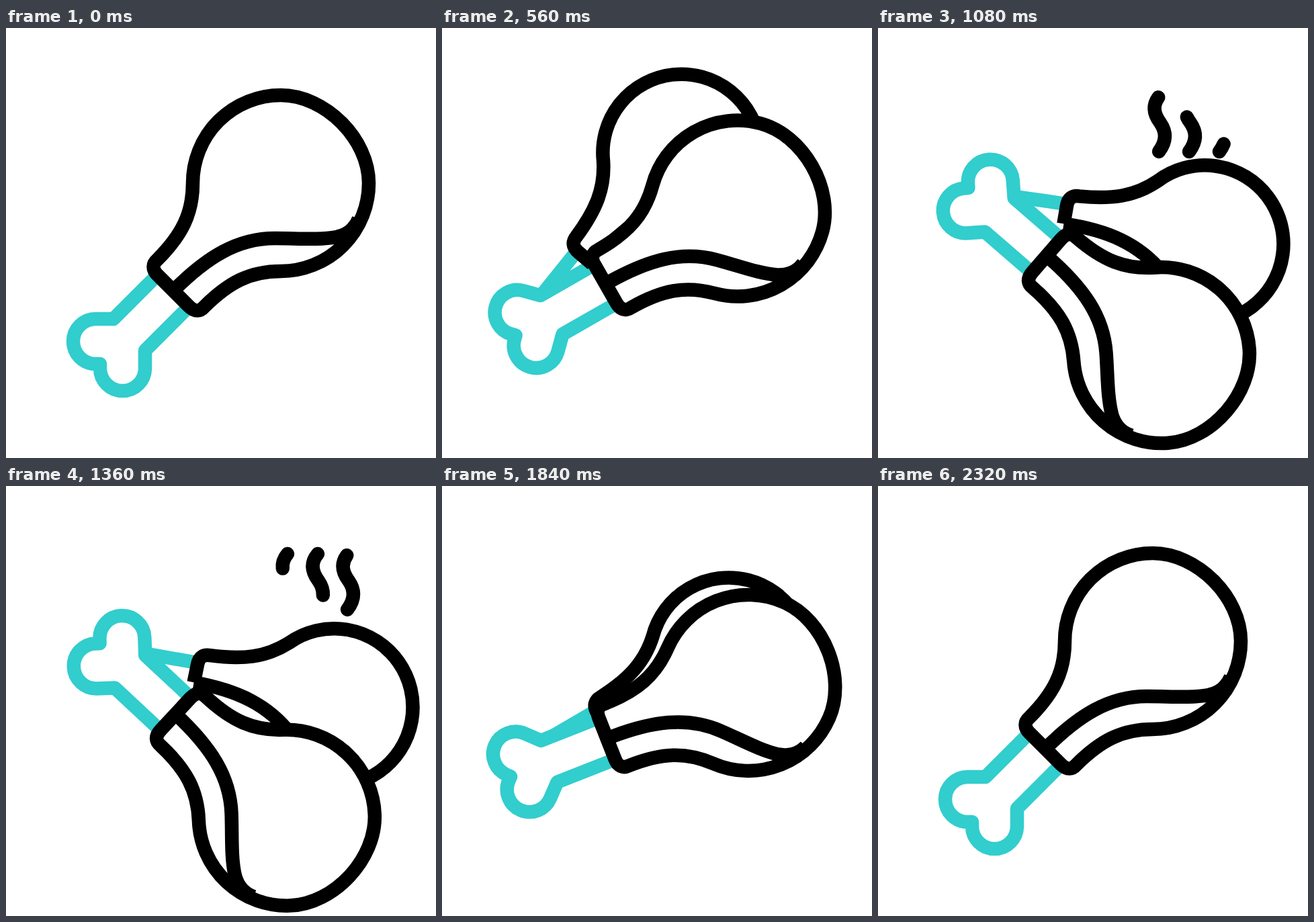
Animation of 640x640 px, one loop 3000 ms. Source, as an HTML page:

```html
<!DOCTYPE html>
<html lang="en">
<head>
<meta charset="utf-8">
<title>Drumsticks</title>
<style>
  html, body { margin: 0; width: 100%; height: 100%; overflow: hidden; background: #fff; }
  svg { display: block; width: 100vw; height: 100vh; }
  path { stroke: #000; stroke-width: 20.5; stroke-linejoin: round; fill: #fff; }
  .bone path { stroke: #32cdcd; }
  .line { fill: none; }
  #steam path { fill: none; stroke-linecap: round; }
</style>
</head>
<body>
<svg viewBox="0 0 640 640">
  <g id="steam"></g>
  <g class="bone">
    <g class="back"><path class="line" d="M165 433L231 367"/></g>
    <g class="front">
      <path d="M230 363L160 433H133.500a33.500 33.500 0 0 0 0 67H140V506.500a33.500 33.500 0 0 0 67 0V480L277 410"/>
    </g>
  </g>
  <g class="back">
    <path d="M253 387L235 368C226 359 227 351 234 344C267 308 284 278 286 237A117 117 0 1 1 403 354"/>
    <path class="line" d="M253 387C300 340 345 315 400 313"/>
  </g>
  <g class="front">
    <path d="M226 368C217 359 218 351 225 345C262 308 278 276 278 231A131 131 0 0 1 409 100C475 100 540 165 540 231A131 131 0 0 1 409 362C364 362 332 378 295 415C289 422 281 423 272 414Z"/>
    <path class="line" d="M249 391C300 340 345 313 400 313C435 313 465 316 492 311C510 307 520 297 525 284"/>
  </g>
</svg>
<script>
const LOOP = 3000, STEP = 40;
const TURN = 88, SPREAD = 33, LEAD = 140, PEAK = 1340;

// Monotone cubic curve through [time, value] points.
function track(points) {
  const slope = i => (points[i + 1][1] - points[i][1]) / (points[i + 1][0] - points[i][0]);
  const tangent = points.map((_, i) => {
    if (i === 0 || i === points.length - 1) return 0;
    const a = slope(i - 1), b = slope(i);
    return a * b > 0 ? 2 * a * b / (a + b) : 0;
  });
  return t => {
    const last = points.length - 1;
    if (t <= points[0][0]) return points[0][1];
    if (t >= points[last][0]) return points[last][1];
    const i = points.findIndex(p => p[0] > t) - 1;
    const [t0, v0] = points[i], [t1, v1] = points[i + 1];
    const d = t1 - t0, u = (t - t0) / d, w = 1 - u;
    return v0 * (1 + 2 * u) * w * w + v1 * u * u * (3 - 2 * u)
      + d * u * w * (tangent[i] * w - tangent[i + 1] * u);
  };
}

const swing = track([
  [380, 0], [490, .05], [560, .173], [630, .41], [700, .65], [760, .8], [840, .935],
  [1080, .976], [PEAK, 1], [1400, 1], [1640, .939], [1740, .6], [1840, .267],
  [1880, .19], [1920, .136], [2000, .073], [2120, .028], [2320, 0]
]);
const shiftX = track([[560, 0], [840, 1], [1080, -4.6], [1640, -4], [1840, 4], [2320, 0]]);
const shiftY = track([[840, 0], [1080, 7], [1640, 9], [1840, 1], [2320, 0]]);

const ease = (t, start, length) => {
  const u = Math.min(1, Math.max(0, (t - start) / length));
  return (1 - Math.cos(Math.PI * u)) / 2;
};

const steam = document.getElementById("steam");
const wisps = [[690, 1070], [825, 1210], [970, 1350]].map(([grow, fade], i) => {
  const path = document.createElementNS("http://www.w3.org/2000/svg", "path");
  path.setAttribute("d", "M418 184C430 168 429 154 420 141C409 126 409 113 419 101");
  path.setAttribute("transform", `translate(${45 * i} 0)`);
  steam.append(path);
  return { path, grow, fade, length: path.getTotalLength() };
});

function drawWisp({ path, grow, fade, length }, t) {
  const head = ease(t, grow, 440), tail = ease(t, fade, 440);
  path.style.display = head > 0 && tail < 1 ? "" : "none";
  const visible = Math.max(.01, (head - tail) * length);
  path.setAttribute("stroke-dasharray", `${visible} ${length * 3}`);
  path.setAttribute("stroke-dashoffset", -tail * length);
}

const place = (name, transform) =>
  document.querySelectorAll("." + name).forEach(el => el.setAttribute("transform", transform));

function draw(t) {
  const spreadTime = t < PEAK ? Math.min(t + LEAD, PEAK) : t;
  const front = `translate(${shiftX(t)} ${shiftY(t)}) rotate(${TURN * swing(t)} 284 365)`;
  place("front", front);
  place("back", `${front} rotate(${-SPREAD * swing(spreadTime)} 186 459)`);
  wisps.forEach(w => drawWisp(w, t));
}

const begin = performance.now();
function tick() {
  const t = (performance.now() - begin) % LOOP;
  draw(Math.floor(t / STEP) * STEP);
  requestAnimationFrame(tick);
}
tick();
</script>
</body>
</html>
```
